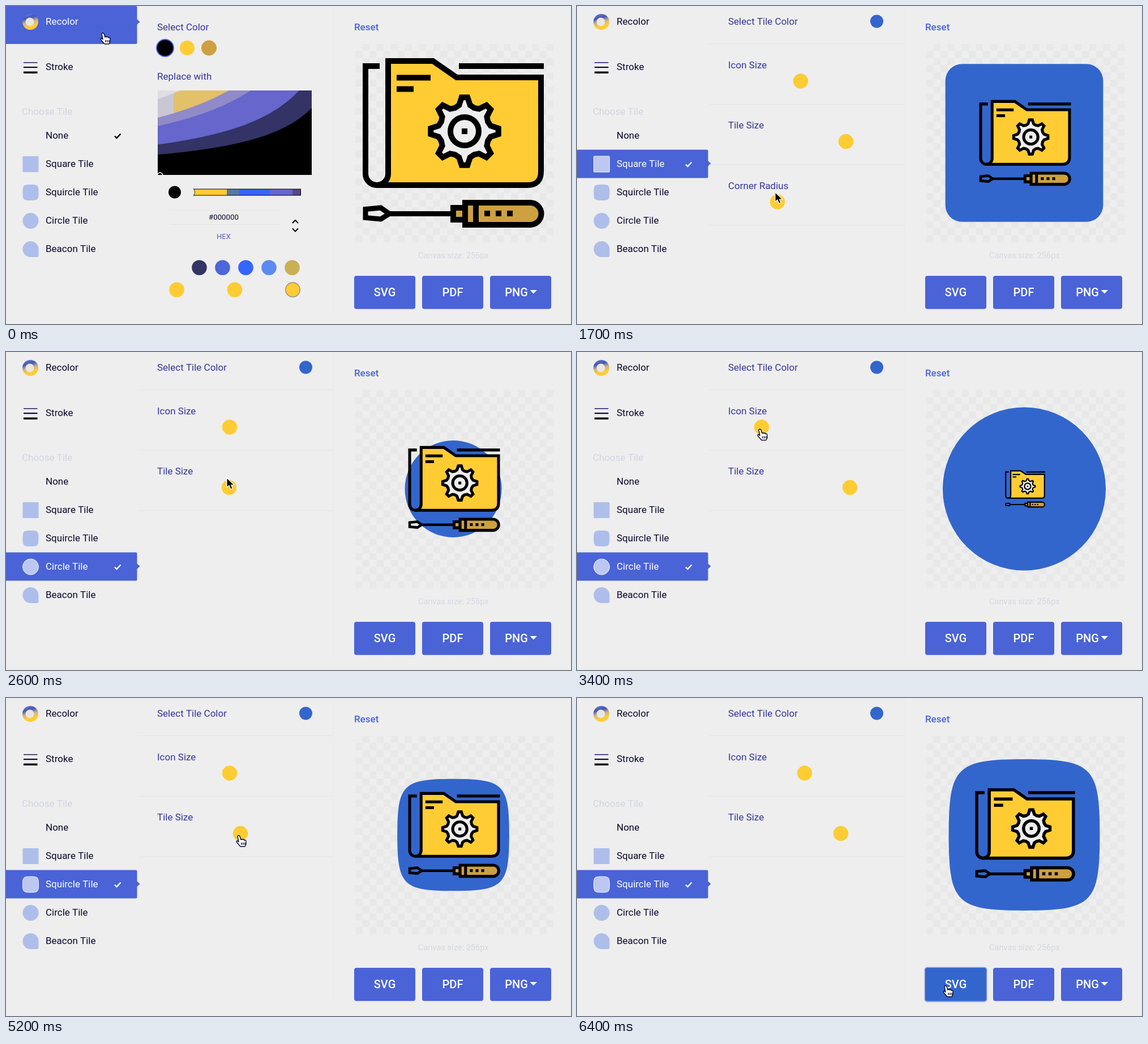
An HTML page with a canvas that plays this animation: 998 by 561 pixels, repeating every 6500 ms.

```html
<!DOCTYPE html>
<html>
<head>
<meta charset="utf-8">
<style>
  html, body { margin: 0; width: 100%; height: 100%; overflow: hidden; background: #eee; }
  canvas { display: block; }
</style>
</head>
<body>
<canvas id="stage" width="998" height="561"></canvas>
<script>
const ctx = document.getElementById('stage').getContext('2d');
const LOOP = 6500, STEP = 100;
const BLUE = '#4a63d7', TILE_BLUE = '#3366cc', YELLOW = '#ffcc33', GOLD = '#cda040';
const INK = '#08082e', LABEL = '#34369a', FAINT = '#e4e4e6', PAPER = '#eeeeee';

const rowNames = ['None', 'Square', 'Squircle', 'Circle', 'Beacon'];
const rowY = name => 228 + 50 * rowNames.indexOf(name);
const sliderNames = ['Icon Size', 'Tile Size', 'Corner Radius'];
const sliderY = name => 132.5 + 106.5 * sliderNames.indexOf(name);

// The user's session: picking tiles, dragging sliders, pressing a button
const pick = (start, row) => ({ start, end: start + 100, row });
const drag = (start, end, slider, to, pointer = 'hand') => ({ start, end, slider, to, pointer });
const actions = [
  pick(600, 'Square'),
  drag(900, 1300, 'Corner Radius', 490, 'arrow'),
  drag(1300, 1700, 'Corner Radius', 354, 'arrow'),
  pick(2000, 'Circle'),
  drag(2300, 2600, 'Tile Size', 394, 'arrow'),
  drag(2600, 2900, 'Tile Size', 482, 'arrow'),
  drag(3100, 3400, 'Icon Size', 326),
  drag(3400, 3600, 'Icon Size', 395),
  pick(3900, 'Beacon'),
  drag(4200, 4500, 'Tile Size', 490),
  pick(4800, 'Squircle'),
  drag(5000, 5200, 'Tile Size', 414),
  drag(5200, 5600, 'Tile Size', 466),
  drag(5800, 6000, 'Icon Size', 402),
  { start: 6400, end: LOOP, button: true }
];

const mix = (a, b, k) => a + (b - a) * k;
const ease = k => k * k * (3 - 2 * k);

function pointAt(action, knobs) {
  if (action.row) return [130, rowY(action.row)];
  if (action.button) return [651, 508];
  const [dx, dy] = action.pointer === 'arrow' ? [-4, -17] : [-3, 4];
  return [knobs[action.slider] + dx, sliderY(action.slider) + dy];
}

// Replays the session up to time t
function stateAt(t) {
  const state = {
    selected: 'Recolor', hover: false, pointer: 'hand', cursor: [171, 48],
    knobs: { 'Icon Size': 395, 'Tile Size': 475, 'Corner Radius': 350 }
  };
  let free = 0;
  for (const action of actions) {
    const goal = pointAt(action, state.knobs);
    if (t < action.start) {
      const k = ease((t - free) / (action.start - free));
      state.cursor = state.cursor.map((v, i) => mix(v, goal[i], k));
      break;
    }
    state.pointer = action.pointer || 'hand';
    if (action.row) state.selected = action.row;
    if (action.button) state.hover = true;
    if (action.slider) {
      const k = Math.min(1, (t - action.start) / (action.end - action.start));
      state.knobs[action.slider] = mix(state.knobs[action.slider], action.to, k);
    }
    state.cursor = pointAt(action, state.knobs);
    free = action.end;
    if (t < free) break;
  }
  return state;
}

function text(str, x, y, color, size = 17, weight = 400, align = 'left') {
  ctx.font = `${weight} ${size}px Roboto, sans-serif`;
  ctx.textAlign = align;
  ctx.fillStyle = color;
  ctx.fillText(str, x, y);
}
function rect(x, y, w, h, color, radius = 0) {
  ctx.beginPath();
  ctx.roundRect(x, y, w, h, radius);
  ctx.fillStyle = color;
  ctx.fill();
}
function disc(x, y, r, color) {
  ctx.beginPath();
  ctx.arc(x, y, r, 0, 7);
  ctx.fillStyle = color;
  ctx.fill();
}
function shape(d, fill, stroke, width = 1) {
  const path = new Path2D(d);
  if (fill) { ctx.fillStyle = fill; ctx.fill(path); }
  if (stroke) { ctx.strokeStyle = stroke; ctx.lineWidth = width; ctx.stroke(path); }
}

function tilePath(kind, x, y, half, radius) {
  ctx.beginPath();
  if (kind === 'Squircle') {
    // Four equal corners, each a quarter turn from the last
    const at = (u, v, turn) => [[u, v], [-v, u], [-u, -v], [v, -u]][turn].map((n, i) => n * half + (i ? y : x));
    ctx.moveTo(...at(0, -1, 0));
    for (let turn = 0; turn < 4; turn++)
      ctx.bezierCurveTo(...at(0.9, -1, turn), ...at(1, -0.9, turn), ...at(1, 0, turn));
  } else {
    const corners = { Square: radius, Circle: half, Beacon: [half, half, radius, half] };
    ctx.roundRect(x - half, y - half, half * 2, half * 2, corners[kind]);
  }
}

function drawSidebar(selected) {
  const onTop = selected === 'Recolor';
  const barY = onTop ? 0 : rowY(selected) - 24.5;
  const mid = onTop ? 28 : rowY(selected);
  rect(0, barY, 231.5, onTop ? 67 : 50, BLUE, [0, 2, 2, 0]);
  shape(`M231 ${mid - 5}l5.5 5-5.5 5z`, BLUE);

  const wheel = ctx.createLinearGradient(38, 14, 46, 42);
  ['#6d76cc', '#4257b4', '#c9b48a', YELLOW, YELLOW].forEach((c, i) => wheel.addColorStop(i / 4, c));
  disc(43, 28, 14, wheel);
  disc(42, 28, 7.5, '#e9e6e4');
  text('Recolor', 70, 33, onTop ? '#fff' : INK);

  rect(31, 99, 24.5, 1.6, '#33246b');
  rect(31, 107, 24.5, 2.2, INK);
  rect(31, 115.5, 24.5, 3.5, '#000');
  text('Stroke', 70, 113, INK);
  text('Choose Tile', 28, 192, '#d3d4e2');

  for (const name of rowNames) {
    const y = rowY(name), on = name === selected;
    text(name === 'None' ? name : name + ' Tile', 70, y + 6, on ? '#fff' : INK);
    if (name !== 'None') {
      tilePath(name, 43.5, y + 1, 14, name === 'Beacon' ? 3 : 1);
      ctx.fillStyle = on ? '#bcc8f2' : '#adbeea';
      ctx.fill();
      if (on) { ctx.strokeStyle = '#eef0fb'; ctx.lineWidth = 1; ctx.stroke(); }
    }
    if (on || (onTop && name === 'None'))
      shape(`M192 ${y + 1.5}l3.5 3.5 7-7.5`, null, on ? '#fff' : '#000', 2.4);
  }
}

// Brightness falls downwards and to the right; each band ends at one level of it
function drawShadePicker(left, top, width, height) {
  const bands = { '#333366': 0.24, '#6666cc': 0.36, '#908ac8': 0.58, '#e3c06a': 0.68, '#dedee4': 0.9 };
  rect(left, top, width, height, '#000');
  for (let x = 0; x < width; x += 2) {
    const u = x / width;
    for (const [color, level] of Object.entries(bands)) {
      const depth = 1 - level / (1 - 0.7 * u);
      const shade = level === 0.68 && u < 0.1 ? '#c9c7d4' : color;
      if (depth > 0) rect(left + x, top, 2, height * depth, shade);
    }
  }
}

function drawRecolorPanel() {
  text('Select Color', 267, 43, LABEL);
  disc(281, 74, 16, BLUE);
  disc(281, 74, 14, '#000');
  disc(320, 74, 13, YELLOW);
  disc(358.5, 74, 13.5, GOLD);
  text('Replace with', 267, 130, LABEL);
  drawShadePicker(268, 149, 272, 149);
  shape('M267 299a5 5 0 0 1 10 0', null, '#fff', 1.5);

  disc(298, 328.5, 11, '#000');
  rect(332, 322.5, 189, 12, '#000');
  const hues = { [YELLOW]: 390, '#5578a6': 412, '#3366ff': 466, '#6666cc': 506, '#55478c': 520 };
  let x = 333;
  for (const [color, end] of Object.entries(hues)) {
    rect(x, 323.5, end - x, 10, color);
    x = end;
  }
  shape('M331 322q5 6 0 13', PAPER, '#333', 1);

  rect(289, 360, 194, 1, FAINT);
  rect(289, 385, 194, 1, FAINT);
  text('#000000', 384.5, 377, INK, 13.3, 400, 'center');
  text('HEX', 384.5, 411, '#5a5ec2', 13, 400, 'center');
  shape('M506 383l5-5 5 5M506 392.500l5 5 5-5', null, '#000', 2);

  ['#333366', '#4d66d9', '#3366ff', '#5b8af0', '#c9b054'].forEach((c, i) => disc(341.5 + 41 * i, 461.5, 13.3, c));
  disc(506.5, 500.5, 13.5, '#98918a');
  for (let i = 0; i < 3; i++) disc(301.5 + 102.5 * i, 500.5, i < 2 ? 13.3 : 12, YELLOW);
}

function drawTilePanel(selected, knobs) {
  text('Select Tile Color', 267, 33, LABEL);
  disc(529.5, 27, 11.5, TILE_BLUE);
  rect(233, 66, 345, 1, FAINT);
  const hasRadius = selected === 'Square' || selected === 'Beacon';
  for (const name of sliderNames.slice(0, hasRadius ? 3 : 2)) {
    const y = sliderY(name);
    text(name, 267, y - 23, LABEL);
    disc(knobs[name], y, 13.2, YELLOW);
    rect(233, y + 40.5, 345, 1, FAINT);
  }
}

function gearPath() {
  const points = [];
  for (let tooth = 0; tooth < 8; tooth++)
    for (const [r, offset] of [[44.5, -22.5], [47, -12], [60, -5], [60, 5], [47, 12]]) {
      const a = (tooth * 45 + offset) * Math.PI / 180;
      points.push(`${810 + r * Math.sin(a)} ${221 - r * Math.cos(a)}`);
    }
  return 'M' + points.join('L') + 'z';
}
const GEAR = gearPath();

// Drawn at its full width of 320, then scaled around its centre
function drawIcon(width) {
  ctx.save();
  ctx.translate(width < 320 ? 791.5 : 790, 241.5);
  ctx.scale(width / 320, width / 320);
  ctx.translate(-790, -241.5);
  const folder = 'M675 296V97H754L796 126H945V292Q945 316 921 316H655';
  shape(folder + 'Q675 314 675 296z', YELLOW);
  shape(folder, null, '#000', 10);
  shape('M660 106H635V296a20 20 0 0 0 40 0M800 106H950M690 126.500H750M690 146.500H720', null, '#000', 10);
  shape(GEAR, PAPER, '#000', 10);
  disc(810, 221, 30, '#000');
  disc(810, 221, 20, PAPER);
  rect(805, 216, 10, 10, '#000');
  shape('M635 358.500L662 356 677 366.500 662 376 635 373.500z', null, '#000', 9);
  shape('M677 366.500H787', null, '#000', 9);
  shape('M790 356H811V377H790z', GOLD, '#000', 10);
  shape('M811 347H926a19.500 19.500 0 0 1 0 39H811z', GOLD, '#000', 10);
  shape('M830 347V386', null, '#000', 10);
  for (let i = 0; i < 3; i++) rect(845 + 20 * i, 361, 10, 10, '#000');
  ctx.restore();
}

function drawPreview(selected, knobs) {
  text('Reset', 615, 43, BLUE, 17, 500);
  const cell = 12.5;
  for (let row = 0; row < 28; row++)
    for (let col = (row + 1) % 2; col < 28; col += 2)
      rect(617 + col * cell, 67 + row * cell, cell, cell, '#e8e8e8');
  if (selected === 'Recolor') {
    drawIcon(320);
  } else {
    const tileSize = 171 + 1.33 * (knobs['Tile Size'] - 394);
    tilePath(selected, 790, 241.5, tileSize / 2, (knobs['Corner Radius'] - 300) * 0.55);
    ctx.fillStyle = TILE_BLUE;
    ctx.fill();
    drawIcon(162 * Math.exp((knobs['Icon Size'] - 395) * 0.012));
  }
  text('Canvas size: 256px', 728, 445, '#d6d7e2', 14.6);
}

function drawButtons(hover) {
  ['SVG', 'PDF', 'PNG'].forEach((label, i) => {
    const x = 615 + 120 * i, active = hover && i === 0;
    if (active) rect(x - 1.5, 474.5, 111, 62, '#98a4df', 5);
    rect(x, 476, 108, 58.5, active ? TILE_BLUE : BLUE, 4);
    text(label, x + (i === 2 ? 46.5 : 54), 512, '#fff', 20, 500, 'center');
  });
  shape('M925.500 501h12.500l-6.250 6.500z', '#fff');
}

function drawCursor([x, y], pointer) {
  ctx.save();
  ctx.translate(x, y);
  ctx.lineJoin = 'round';
  if (pointer === 'hand')
    shape('M-2 1Q0-2 2 1L4 7Q6 5 7 7 9 5 10 8 13 7 13 10L13 15 11 19H3L-3 12Q-5 9-2 9L0 11z' +
      'M5 12v4M8 12v4M11 12v4', '#fff', INK, 1.4);
  else
    shape('M0 0V17L4 13.500 7 20 10 18.500 7.500 12.500H13z', '#000', '#fff', 1.2);
  ctx.restore();
}

function draw(t) {
  const { selected, knobs, hover, cursor, pointer } = stateAt(t);
  rect(0, 0, 998, 561, PAPER);
  rect(578, 0, 1, 540, '#ebebeb');
  drawSidebar(selected);
  if (selected === 'Recolor') drawRecolorPanel();
  else drawTilePanel(selected, knobs);
  drawPreview(selected, knobs);
  drawButtons(hover);
  drawCursor(cursor, pointer);
}

function tick() {
  draw(Math.floor(performance.now() % LOOP / STEP) * STEP);
  requestAnimationFrame(tick);
}
tick();
</script>
</body>
</html>
```
